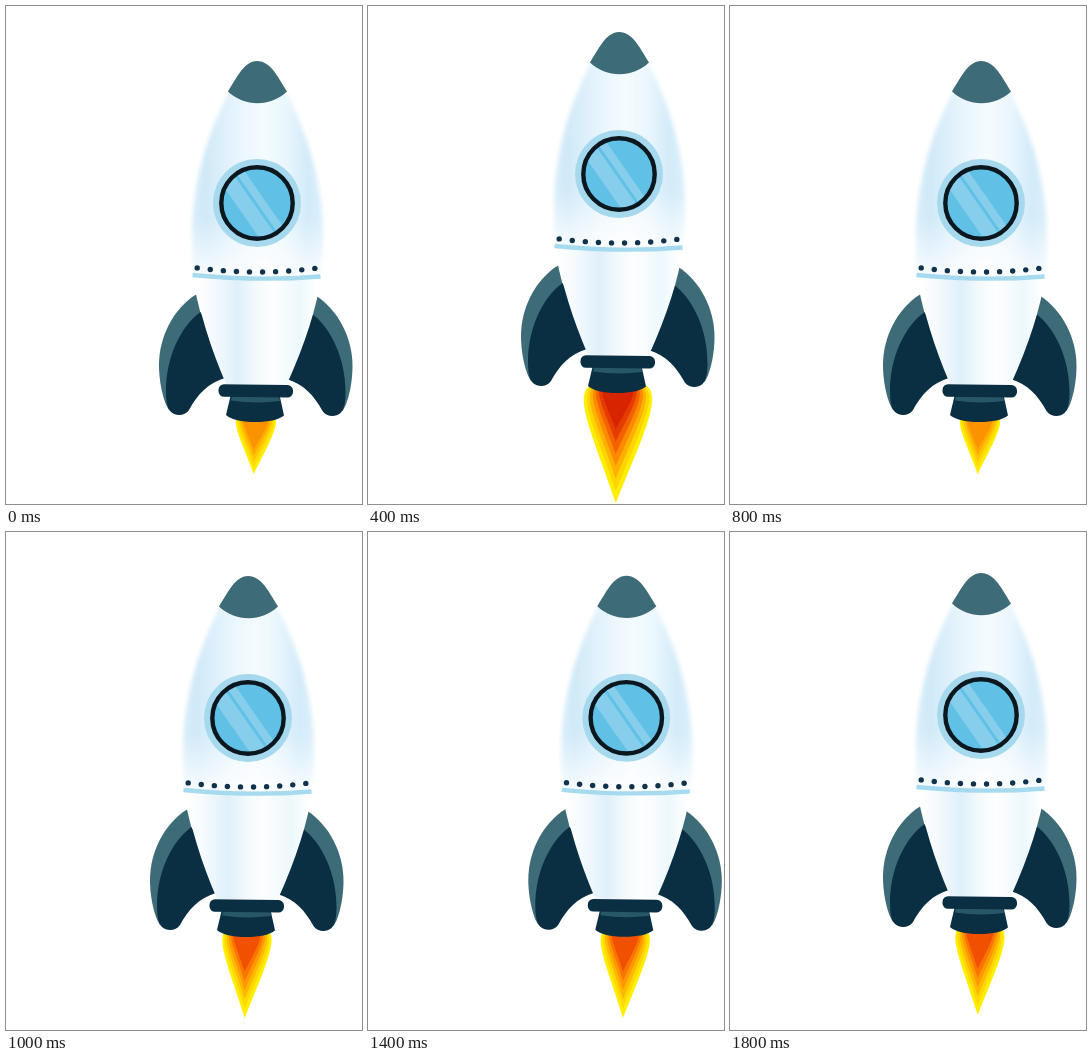
Animation of 356x498 px, one loop 2 s. Source, as an HTML page:

```html
<!DOCTYPE html>
<html lang="en">
<head>
<meta charset="utf-8">
<title>Rocket</title>
<style>
html, body { margin: 0; width: 100%; height: 100%; overflow: hidden; background: #fff; }
svg { display: block; width: 356px; height: 498px; }
</style>
</head>
<body>
<svg viewBox="0 0 356 498">
  <defs>
    <linearGradient id="hull" gradientUnits="userSpaceOnUse" x1="184" y1="0" x2="318" y2="0">
      <stop offset="0" stop-color="#d9eefa"/>
      <stop offset=".12" stop-color="#d0e9f8"/>
      <stop offset=".28" stop-color="#e0f1fb"/>
      <stop offset=".42" stop-color="#edf7fd"/>
      <stop offset=".55" stop-color="#f5fbfe"/>
      <stop offset=".72" stop-color="#e9f6fd"/>
      <stop offset=".88" stop-color="#d2ebf9"/>
      <stop offset="1" stop-color="#dcf0fb"/>
    </linearGradient>
    <linearGradient id="base" gradientUnits="userSpaceOnUse" x1="190" y1="0" x2="312" y2="0">
      <stop offset="0" stop-color="#fff"/>
      <stop offset=".14" stop-color="#f4fafe"/>
      <stop offset=".34" stop-color="#dff0fa"/>
      <stop offset=".48" stop-color="#f1f9fd"/>
      <stop offset=".62" stop-color="#fdfeff"/>
      <stop offset=".85" stop-color="#edf8fd"/>
      <stop offset="1" stop-color="#fff"/>
    </linearGradient>
    <linearGradient id="fade" x1="0" y1="0" x2="0" y2="1">
      <stop offset="0" stop-color="#fff" stop-opacity="0"/>
      <stop offset=".68" stop-color="#fff" stop-opacity="0"/>
      <stop offset="1" stop-color="#fff" stop-opacity=".85"/>
    </linearGradient>
    <filter id="soft" x="-10%" y="-10%" width="120%" height="120%"><feGaussianBlur stdDeviation="2.2"/></filter>
    <clipPath id="glass"><circle cx="251" cy="197" r="35"/></clipPath>
    <g id="fin">
      <path fill="#3d6b77" d="M190 288.500C167 303 153 331 153 359C153 378 158 397 163 404L194 372L200 330Z"/>
      <path fill="#0a2f43" d="M194.500 306C174 321 160 352 160 385C160 397 162 403 165 406C170 410.500 179 410 183 404C191 389 202 377 219 372L205 325Z"/>
    </g>
  </defs>
  <g id="rocket">
    <g id="flame"></g>
    <use href="#fin"/>
    <use href="#fin" transform="matrix(-1 0 0 1 499.500 1)"/>
    <path fill="url(#base)" d="M187 270Q251 279 315 271C311 301 299 338 281 378H220C204 340 194 308 187 270Z"/>
    <g filter="url(#soft)">
      <path id="shell" fill="url(#hull)" d="M223 86C198 134 186 184 186 230Q186 252 188 267Q251 276 314 268Q317 252 317 230C317 184 305 134 280 86Z"/>
      <path fill="url(#fade)" d="M223 86C198 134 186 184 186 230Q186 252 188 267Q251 276 314 268Q317 252 317 230C317 184 305 134 280 86Z"/>
    </g>
    <path fill="#3d6b77" d="M222 85.500C230 73 238 55 251 55C265 55 273 73 281 85.500C265 101 238 101 222 85.500Z"/>
    <circle cx="251" cy="197" r="44" fill="#a7d9ee"/>
    <circle cx="251" cy="197" r="35.500" fill="#60c0e6"/>
    <g clip-path="url(#glass)" stroke="#86ceeb">
      <path stroke-width="15" d="M211 158L271 244"/>
      <path stroke-width="8" d="M223 150L283 236"/>
    </g>
    <circle cx="251" cy="197" r="35.700" fill="none" stroke="#0b171e" stroke-width="4.400"/>
    <g id="rivets" fill="#10324a"></g>
    <path fill="none" stroke="#a5daef" stroke-width="4.300" d="M186.500 269Q251 275.500 314.500 270.500"/>
    <path fill="#0a2f43" d="M225 388L273.500 389L278 409.500Q270 416 249 416Q228 416 220 409Z"/>
    <path fill="#285767" d="M226 390H273L274 395Q250 398 225 394.500Z"/>
    <rect x="212.500" y="378.600" width="74.500" height="12.600" rx="5.500" fill="#0a2f43" transform="rotate(.7 250 385)"/>
  </g>
</svg>
<script>
const el = id => document.getElementById(id);
const STEP = 200;

// x offset, y offset, thrust level
const LOW = [0, 0, 0], HIGH = [0, -29, 2];
const poses = [
  LOW, [-6, -15.3, 1], HIGH, [10, -17, 1], LOW,
  [-9, -11, 1], HIGH, [7.3, -11.2, 1], LOW, [0, -14, 1]
];

// half width, length, colours from outside in
const thrust = [
  [20, 59, ['#ffee00', '#ffdc00', '#ffc400', '#ffaa00', '#fb9200']],
  [24.5, 88, ['#ffee00', '#ffd800', '#ffb800', '#ff9800', '#f97400', '#f05000']],
  [34, 117, ['#ffee00', '#ffd400', '#ffb000', '#fd8a00', '#f46200', '#e53c00', '#d82400']]
];

function plume(w, len, color) {
  const top = 409, mid = 250, tip = 247.7;
  const at = (x, y) => `${mid + x * w} ${top + y * len}`;
  const end = `${tip} ${top + len}`;
  return `<path fill="${color}" d="M${at(-.85, 0)}C${at(-1.3, .1)} ${at(-.7, .45)} ${end}` +
    `C${at(.7, .45)} ${at(1.3, .1)} ${at(.85, 0)}Z"/>`;
}

const flames = thrust.map(([w, len, colors]) =>
  colors.map((c, i) => plume(w * (1 - i * .09), len * (1 - i * .105), c)).join(''));

el('rivets').innerHTML = Array.from({ length: 10 }, (_, i) => {
  const x = 191.2 + i * 13.07;
  const y = 266 - 4 * ((x - 252) / 60) ** 2;
  return `<circle cx="${x}" cy="${y}" r="2.7"/>`;
}).join('');

let shown = -1;
function draw(now) {
  const i = Math.floor(now / STEP) % poses.length;
  if (i !== shown) {
    const [x, y, level] = poses[i];
    el('rocket').setAttribute('transform', `translate(${x} ${y})`);
    el('flame').innerHTML = flames[level];
    shown = i;
  }
}

function tick() {
  draw(performance.now());
  requestAnimationFrame(tick);
}
tick();
</script>
</body>
</html>
```
